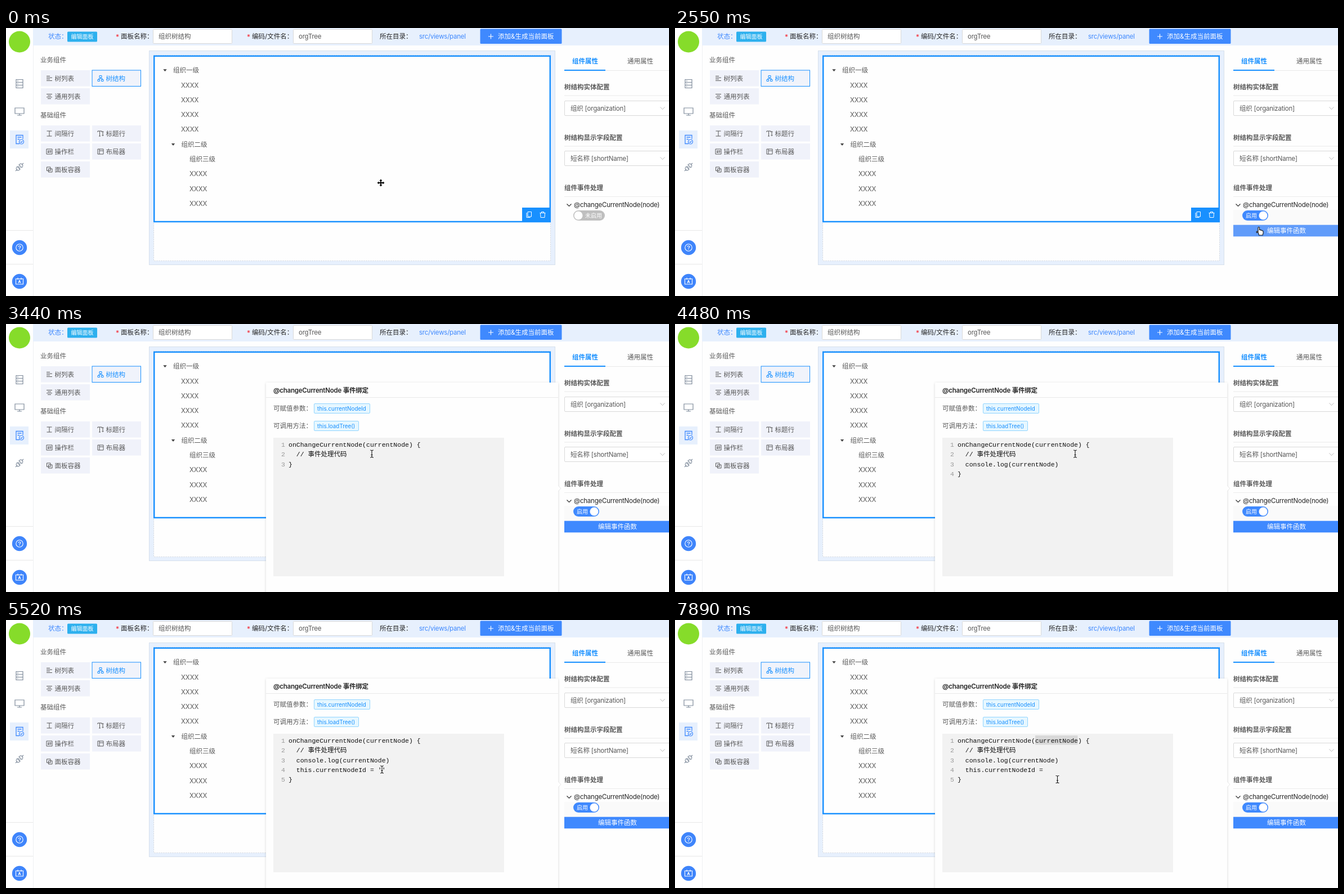
An HTML page for the animation above (8 s loop, 1178 px wide and 476 px high).

```html
<!DOCTYPE html>
<html lang="zh-CN">
<head>
<meta charset="utf-8">
<title>面板编辑</title>
<style>
html, body { margin: 0; width: 100%; height: 100%; overflow: hidden; background: #fefefe; }
svg { display: block; width: 100%; height: 100%; }
text { font-family: Inter, "Noto Sans CJK SC", "Noto Sans CJK", sans-serif; white-space: pre; }
.l { letter-spacing: -.22px; }
.b { font-weight: 600; }
.m { font-family: "Liberation Mono", "Noto Sans CJK SC", "Noto Sans CJK", monospace; }
</style>
</head>
<body>
<svg id="stage" viewBox="0 0 1178 476"></svg>
<script>
const BLUE = '#1890ff', BTN = '#3f89fe', PALE = '#e7f0fd', GREY = '#595959', DARK = '#262626', LINE = '#d9d9d9';
const stage = document.getElementById('stage');

const rect = (x, y, w, h, fill, more = '') =>
  `<rect x="${x}" y="${y}" width="${w}" height="${h}" fill="${fill}" ${more}/>`;
const box = (x, y, w, h, fill, line, more = '') =>
  rect(x + .5, y + .5, w - 1, h - 1, fill, `stroke="${line}" ${more}`);
// y is the middle of the line of text
const text = (x, y, s, color = GREY, cls = '', size = 11.5, more = '') =>
  `<text x="${x}" y="${y + size * .37}" fill="${color}" class="${cls}" font-size="${size}" ${more}>${s}</text>`;
const path = (x, y, d, color, width = 1, more = '') =>
  `<path transform="translate(${x} ${y})" d="${d}" fill="none" stroke="${color}" stroke-width="${width}" ${more}/>`;
const solid = (x, y, d, color) => `<path transform="translate(${x} ${y})" d="${d}" fill="${color}"/>`;
const disc = (x, y, r, fill) => `<circle cx="${x}" cy="${y}" r="${r}" fill="${fill}"/>`;
const group = (id, content) => `<g id="${id}">${content}</g>`;

function sidebar() {
  const c = '#7f8b9b';
  return rect(0, 0, 48, 476, '#fff') + rect(48, 31, 1, 445, '#eef0f2') +
    disc(24, 24.5, 19, '#86dc2a') +
    path(24, 99, 'M-6-7.5H6V7.5H-6ZM-6-2.5H6M-6 2.5H6M-4-5H-2M-4 0H-2M-4 5H-2', c, 1.2) +
    path(24, 148, 'M-8-6H8V4H-8ZM0 4V7M-4 7H4', c, 1.2) +
    rect(7, 182, 33, 32, PALE) +
    path(24, 198, 'M0 7.5H-6V-7.5H6V-1M-3.5-4H3.5M-3.5-.5H0', BTN, 1.3) +
    path(27.5, 202, 'M-4 0A4 4 0 1 0 4 0A4 4 0 1 0-4 0M-1.8 0L-.4 1.4L2-1.2', BTN, 1.2) +
    path(24, 247, 'M-7 7L-4.5 4.5M7-7L4.5-4.5M-4-1L1 4L-1 5.5Q-3 6.5-5 4.5Q-6.5 2.5-5.5 1ZM-1-4L4 1L5.5-1Q6.5-3 4.5-5Q2.5-6.5 1-5.5ZM-2.5.5L-.5-1.5M-.5 2.5L1.5.5', c, 1.1) +
    rect(0, 359, 48, 1, '#e8e8e8') + rect(0, 419, 48, 1, '#e8e8e8') +
    disc(24, 390, 13.2, '#3f85fb') + disc(24, 450, 13.2, '#3f85fb') +
    path(24, 390, 'M-6.2 0A6.2 6.2 0 1 0 6.2 0A6.2 6.2 0 1 0-6.2 0M-2-1.2Q-2-3 0-3T2-1.3Q2-.4 0 .6V1.5M0 2.6V3.8', '#fff', 1.1) +
    path(24, 450, 'M-6.5-4.5H6.5V5H-6.5ZM-3-6.5V-3M3-6.5V-3M-2 3L0-2L2 3M-1.2 1.2H1.2', '#fff', 1.1);
}

function header() {
  const star = x => text(x, 16, '*', '#f5222d', '', 12);
  return rect(48, 0, 1130, 31, PALE) +
    text(75, 15, '状态：', BTN) +
    rect(109, 6.5, 53, 18, '#2db0ee', 'rx="1.5"') + text(115.5, 15.5, '编辑面板', '#fff', '', 10) +
    star(195) + text(204, 15, '面板名称：', DARK) +
    box(261, 2, 141, 26, '#fff', LINE, 'rx="1"') + text(271, 15, '组织树结构') +
    star(428) + text(437, 15, '编码/文件名：', DARK) +
    box(510, 2, 141, 26, '#fff', LINE, 'rx="1"') + text(520, 15, 'orgTree', GREY, 'l') +
    text(664, 15, '所在目录：', DARK) + text(734, 15, 'src/views/panel', BTN, 'l') +
    rect(842.5, 1.5, 145, 26.5, BTN, 'rx="1.5"') +
    path(861.5, 15, 'M-4.5 0H4.5M0-4.5V4.5', '#fff', 1.1) + text(874, 15, '添加&amp;生成当前面板', '#fff');
}

function palette() {
  const items = [
    [62, 75, '树列表', 'M-5-4H1M-5-1.3H5M-5 1.3H1M-5 4H5'],
    [153, 75, '树结构', 'M-2-5H2V-1.5H-2ZM-5 2H-1.5V5H-5ZM1.5 2H5V5H1.5ZM0-1.5V.3M-3.2 2V.3H3.2V2'],
    [62, 107, '通用列表', 'M-5-4H5M-3-1.3H3M-5 1.3H5M-3 4H3'],
    [62, 173, '间隔行', 'M-4.5-4.5H4.5M-4.5 4.5H4.5M0-4.5V4.5'],
    [153, 173, '标题行', 'M-5-2.5V-4.5H2V-2.5M-1.5-4.5V4.5M-3 4.5H0M4-4V4M2.5-2.5L4-4L5.5-2.5M2.5 2.5L4 4L5.5 2.5'],
    [62, 205, '操作栏', 'M-5-4.5H5V4.5H-5ZM-2-2.5V2.5M0-2.5V2.5M2.5-2.5V2.5M-3 1H-1M1.5-1H3.5'],
    [153, 205, '布局器', 'M-5-4.5H5V4.5H-5ZM-2-4.5V4.5M-2-1.5H5'],
    [62, 237, '面板容器', 'M-4.5-4.5H2V2H-4.5ZM-1.5-1.5H5V4.5H-1.5Z'],
  ];
  return text(61, 57, '业务组件') + text(61, 155, '基础组件') +
    items.map(([x, y, name, icon], i) => {
      const on = i == 1, c = on ? BLUE : GREY;
      return (on ? box(x - .5, y - .5, 87.5, 29.5, '#f0f3fb', BLUE) : rect(x, y, 87, 28.5, '#f0f2fa')) +
        path(x + 15, y + 14.5, icon, c) + text(x + 24.5, y + 14.5, name, c);
    }).join('');
}

function canvasArea() {
  const rows = [[297, '组织一级'], [311, 'XXXX'], [311, 'XXXX'], [311, 'XXXX'], [311, 'XXXX'],
    [311.5, '组织二级'], [326, '组织三级'], [326, 'XXXX'], [326, 'XXXX'], [326, 'XXXX']];
  return box(254, 40, 722, 381, PALE, '#d6e0ec') +
    box(262, 48, 706, 366, '#fefefe', '#d2d6dc', 'stroke-dasharray="2 2"') +
    rect(263.2, 49.8, 703.6, 294.2, '#fefefe', `stroke="${BLUE}" stroke-width="2.5"`) +
    rows.map(([x, s], i) => text(x, 75 + i * 26.3, s)).join('') +
    [[282.5, 75], [297, 206.7]].map(([x, y]) => solid(x, y, 'M-3.2-1.8H3.2L0 2.2Z', '#444')).join('') +
    rect(917, 319, 50, 25, BLUE) +
    path(929, 331.5, 'M-4-3.5V5H2.5M-2-5H4.5V3.5H-2Z', '#fff') +
    path(953.5, 331.5, 'M-5-3H5M-2-3V-5H2V-3M-4-3L-3.5 5H3.5L4-3', '#fff');
}

function properties() {
  const heading = (y, s) => text(992, y, s, GREY, 'b') + rect(992, y + 15, 186, 1, '#ececec');
  const select = (y, s) => box(992, y, 200, 27, '#fff', LINE, 'rx="1.5"') + text(1003, y + 13.5, s, GREY, 'l') +
    path(1166.5, y + 13.5, 'M-4-2.2L0 2.2L4-2.2', '#bfbfbf');
  return text(1006, 58.5, '组件属性', BLUE, 'b') + text(1104, 58.5, '通用属性') +
    rect(992, 75, 186, 1, '#e8e8e8') + rect(992, 74, 73, 2, BLUE) +
    heading(104.5, '树结构实体配置') + select(129, '组织 [organization]') +
    heading(194.5, '树结构显示字段配置') + select(218, '短名称 [shortName]') +
    heading(284, '组件事件处理') +
    path(1000.5, 314.5, 'M-4-2L0 2L4-2', '#333', 1.2) + text(1009, 314, '@changeCurrentNode(node)', DARK, 'l') +
    group('off', rect(1008, 324, 56, 18, '#bfbfbf', 'rx="9"') + disc(1017, 333, 7.5, '#fff') +
      text(1029, 333, '未启用', '#fff', '', 10)) +
    group('on', rect(992, 323, 186, 27, '#fafafa') + rect(1008, 324, 46, 18, BTN, 'rx="9"') +
      disc(1045, 333, 7.5, '#fff') + text(1014, 333, '启用', '#fff', '', 10) +
      rect(992, 349.7, 186, 20.6, BTN, 'id="edit"') + text(1052, 360, '编辑事件函数', '#fff'));
}

function popover() {
  const tag = (y, w, s) => box(547, y, w, 18, '#e6f7ff', '#91d5ff', 'rx="1.5"') +
    text(553, y + 9, s, BLUE, '', 9.85);
  return rect(462, 104, 519, 400, '#fefefe', 'rx="2" filter="url(#shade)"') +
    solid(981, 292, 'M-.5-5L4.5 0L-.5 5Z', '#fff') + path(981, 292, 'M0-5L5 0L0 5', '#e8e8e8') +
    text(475, 118, '@changeCurrentNode 事件绑定', DARK, 'b l') + rect(462, 130, 519, 1, '#e8e8e8') +
    text(475, 150, '可赋值参数：') + tag(141, 100, 'this.currentNodeId') +
    text(475, 181, '可调用方法：') + tag(172, 80, 'this.loadTree()') +
    rect(475, 202, 410, 246, '#f2f2f2') +
    rect(640, 205, 75.5, 16.5, '#d9d9d9', 'id="selection"') + group('code', '');
}

function pointers() {
  const shapes = {
    move: 'M0-6.5L2.6-3.5H.9V-.9H3.5V-2.6L6.5 0L3.5 2.6V.9H.9V3.5H2.6L0 6.5L-2.6 3.5H-.9V.9H-3.5V2.6L-6.5 0L-3.5-2.6V-.9H-.9V-3.5H-2.6Z',
    arrow: 'M-3.5-6V6.2L-.7 3.6L1.2 7.7L3.2 6.8L1.4 2.8H5.2Z',
    hand: 'M-3.5 1V-6.2Q-3.5-7.5-2.3-7.5T-1.1-6.2V-2.4Q.8-3.2 1.2-1.8Q3-2.4 3.4-1Q5.6-1.4 5.6.6V3.5Q5 5 4.6 7H-2Q-3 0-5.8 2.6Q-7 1-5.8.2Q-4.6-.4-3.5 1Z',
    beam: 'M-3-6.5Q0-6.5 0-5Q0-6.5 3-6.5M0-5V5M-3 6.5Q0 6.5 0 5Q0 6.5 3 6.5M-1.6 2H1.6',
  };
  const draw = (kind, d) => kind == 'beam'
    ? path(0, 0, d, '#fff', 2) + path(0, 0, d, '#111', 1.1)
    : kind == 'hand'
      ? `<path d="${d}" fill="#fff" stroke="#111" stroke-width="1.1"/>`
      : `<path d="${d}" fill="#000" stroke="#fff" stroke-width="1.6" paint-order="stroke"/>`;
  return Object.entries(shapes).map(([kind, d]) => group(kind, draw(kind, d))).join('');
}

stage.innerHTML = `<filter id="shade" x="-5%" y="-5%" width="110%" height="110%">
  <feDropShadow dx="0" dy="1" stdDeviation="2" flood-opacity=".16"/></filter>` +
  rect(0, 0, 1178, 476, '#fefefe') + sidebar() + header() + palette() + canvasArea() + properties() +
  group('popover', popover()) + pointers();

const track = [
  [0, 'move', 666, 275], [1350, 'move', 688, 279], [1500, 'move', 812, 302], [1650, 'arrow', 988, 340],
  [1800, 'arrow', 1070, 350], [1950, 'arrow', 1057, 338], [2100, 'hand', 1038, 336], [2250, 'hand', 1037, 338],
  [2400, 'hand', 1037, 354], [2550, 'hand', 1039.5, 361], [2690, 'arrow', 930, 315], [2840, 'beam', 737, 248.5],
  [2990, 'beam', 690, 240], [3140, 'beam', 665, 233], [3290, 'beam', 655, 231], [3440, 'beam', 650, 230.5],
  [3730, ''], [4480, 'beam', 711, 230.5], [4630, 'beam', 692, 185], [4780, 'arrow', 650, 150],
  [4930, 'beam', 696, 248], [5070, ''], [5520, 'beam', 668, 265.5], [5670, 'beam', 671, 265.5],
  [5820, 'beam', 672, 265.5], [5960, 'beam', 670, 265.5], [6700, ''], [7150, 'beam', 677, 265.5],
  [7290, 'beam', 675, 213.5], [7740, 'beam', 685, 260], [7890, 'beam', 679.5, 283],
];
const assign = 'this.currentNodeId = ';
const typing = [[0, ''], [5220, assign.slice(0, 11)], [5370, assign + "''"], [6700, assign + "'"], [6850, assign]];
const at = (list, t) => list.findLast(k => k[0] <= t);

const $ = id => document.getElementById(id);
const show = (id, on) => $(id).style.display = on ? '' : 'none';

function codeLines(t) {
  const lines = ['onChangeCurrentNode(currentNode) {', '  // 事件处理代码'];
  if (t >= 3730) lines.push(t < 3880 ? '' : '  console.log(currentNode)');
  if (t >= 5070) lines.push('  ' + at(typing, t)[1]);
  return [...lines, '}'];
}

let shown = '';
function render(t) {
  show('off', t < 2250);
  show('on', t >= 2250);
  $('edit').setAttribute('fill', t < 2400 || t >= 2990 ? BTN : t < 2690 ? '#619cfa' : '#6aa3fa');
  show('popover', t >= 2690);
  show('selection', t >= 7590);

  const lines = codeLines(t), key = lines.join('\n');
  if (key != shown) {
    shown = key;
    $('code').innerHTML = lines.map((s, i) => {
      const y = 213.5 + i * 17.4;
      return text(496, y, i + 1, '#999', 'm', 11.5, 'text-anchor="end"') + text(502, y, s, '#111', 'm', 11.5);
    }).join('');
  }

  const [, kind, x, y] = at(track, t);
  for (const id of ['move', 'arrow', 'hand', 'beam']) show(id, id == kind);
  if (kind) $(kind).setAttribute('transform', `translate(${x} ${y})`);
}

const start = performance.now();
function tick() {
  render((performance.now() - start) % 8000);
  requestAnimationFrame(tick);
}
tick();
</script>
</body>
</html>
```
